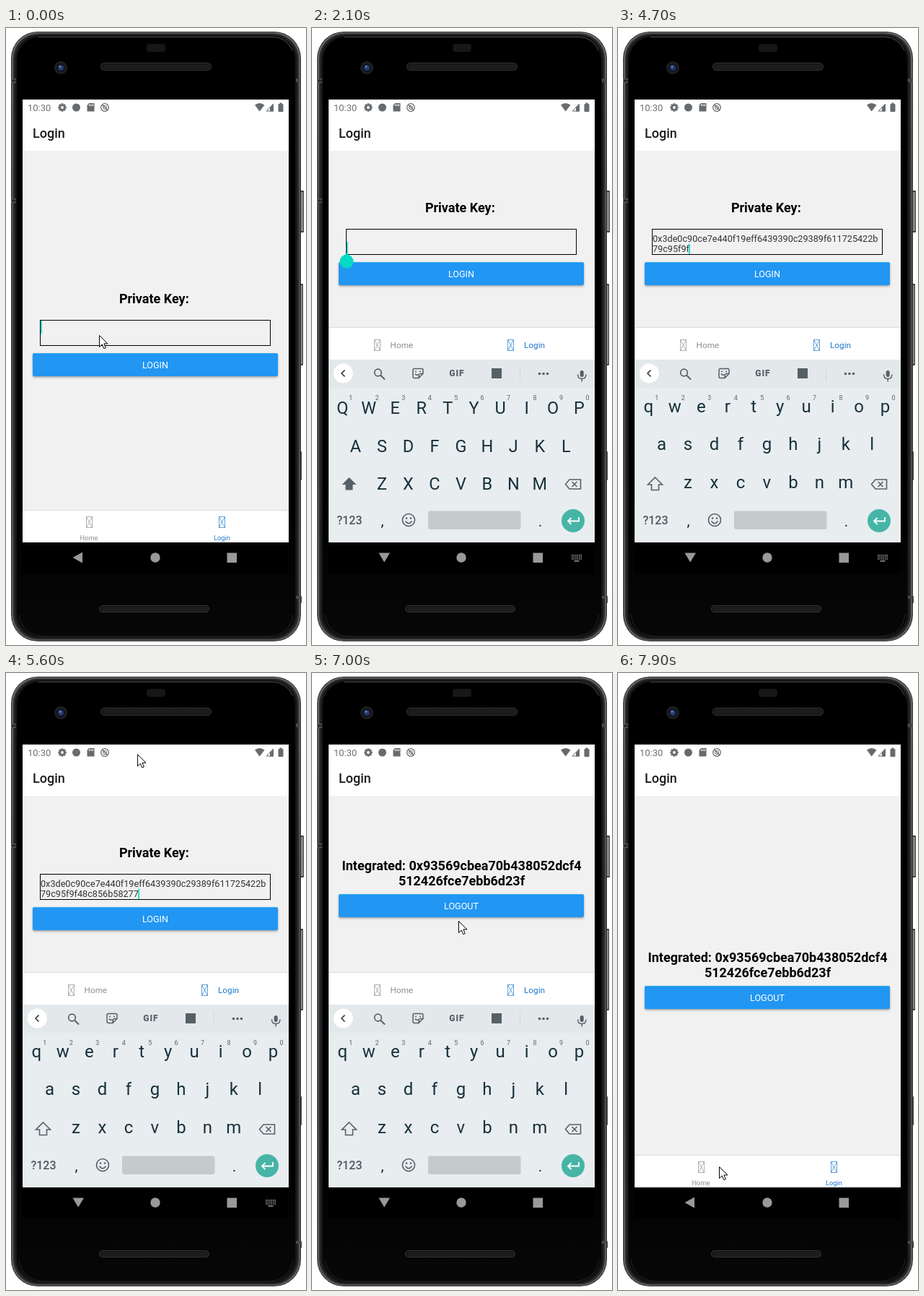
Recreate the animation shown at these times as an HTML page with a canvas. Size 416 by 854 pixels, loop 8000 ms.

```html
<!DOCTYPE html>
<html lang="en">
<head>
<meta charset="utf-8">
<title>Login demo</title>
<style>
html, body { margin: 0; width: 100%; height: 100%; overflow: hidden; background: #fff; }
canvas { display: block; }
</style>
</head>
<body>
<canvas id="stage" width="416" height="854"></canvas>
<script>
const ctx = document.getElementById('stage').getContext('2d');
const LOOP = 8000, STEP = 100;
const KEY = ['0x3de0c90ce7e440f19eff6439390c29389f611725422b', '79c95f9f48c856b58277'];
const ADDRESS = ['Integrated: 0x93569cbea70b438052dcf4', '512426fce7ebb6d23f'];
const ROWS = ['QWERTYUIOP', 'ASDFGHJKL', 'ZXCVBNM'];
const GREY = '#676b6e', INK = '#17313a', ICON = '#566166', TEAL = '#03dac5';

const clamp = (v, a, b) => Math.min(b, Math.max(a, v));

function rect(x, y, w, h, color) {
  ctx.fillStyle = color;
  ctx.fillRect(x, y, w, h);
}
function round(x, y, w, h, r, color) {
  ctx.fillStyle = color;
  ctx.beginPath();
  ctx.roundRect(x, y, w, h, r);
  ctx.fill();
}
function disc(x, y, r, color) {
  ctx.fillStyle = color;
  ctx.beginPath();
  ctx.arc(x, y, r, 0, Math.PI * 2);
  ctx.fill();
}
function ring(x, y, r, color, width) {
  ctx.strokeStyle = color;
  ctx.lineWidth = width;
  ctx.beginPath();
  ctx.arc(x, y, r, 0, Math.PI * 2);
  ctx.stroke();
}
function poly(points, color) {
  ctx.fillStyle = color;
  ctx.fill(new Path2D('M' + points + 'Z'));
}
function line(path, color, width = 1) {
  ctx.strokeStyle = color;
  ctx.lineWidth = width;
  ctx.stroke(new Path2D(path));
}
function text(str, x, y, size, color, weight = 400, align = 'left') {
  ctx.font = `${weight} ${size}px Roboto, sans-serif`;
  ctx.fillStyle = color;
  ctx.textAlign = align;
  ctx.fillText(str, x, y);
  return ctx.measureText(str).width;
}
function at(x, y, draw) {
  ctx.save();
  ctx.translate(x, y);
  draw();
  ctx.restore();
}
function vertical(y0, y1, ...colors) {
  const g = ctx.createLinearGradient(0, y0, 0, y1);
  colors.forEach((c, i) => g.addColorStop(i / (colors.length - 1), c));
  return g;
}

function grille(x, y, w, h) {
  round(x, y, w, h, h / 2, '#161616');
  ctx.strokeStyle = '#333';
  ctx.lineWidth = 1;
  ctx.beginPath();
  ctx.roundRect(x + .5, y + .5, w - 1, h - 1, h / 2);
  ctx.stroke();
  for (let i = 4; i < w - 4; i += 3)
    for (let j = 3; j < h - 2; j += 2) rect(x + i + j % 4 / 2, y + j, 1, 1, '#3c3c3c');
}

function phone() {
  rect(0, 0, 416, 854, '#fff');
  // side buttons
  for (const [y, h, w] of [[225, 58, 5], [354, 113, 4], [586, 40, 2], [786, 10, 2]]) {
    round(407, y, w + 1, h, 1, '#3f3f3f');
    rect(409, y + 2, w - 2, h - 4, '#8a8a8a');
  }
  // nested rims from the outer edge to the glass
  round(7, 5, 402, 844, 37, '#303030');
  round(8, 6, 400, 842, 36, vertical(6, 848, '#686868', '#4c4c4c', '#4c4c4c', '#606060'));
  round(10, 7.5, 396, 839, 35, '#2a2a2a');
  round(12.5, 9.5, 391, 835, 34, '#151515');
  for (const y of [70, 236]) {
    rect(7, y, 7, 6, '#555');
    rect(8, y + 1.5, 6, 3, '#292929');
  }
  rect(402, 70, 7, 5, '#484848');
  rect(402, 786, 7, 4, '#484848');
  round(15, 12, 386, 830, 33, vertical(12, 842, '#000', '#000', '#000', '#000', '#070707'));
  line('M45 12.5H370Q389 13 397 31', '#464646');
  line('M18 812Q22 839 50 842H366Q394 839 398 812', '#252525');
  round(195, 22, 26, 11, 4, '#171717');
  disc(76, 55, 9, '#202020');
  disc(76, 55, 6.5, '#101522');
  disc(76, 55, 3.8, '#283b70');
  disc(75, 53.5, 1.3, '#7690c9');
  grille(131, 48, 154, 11);
  grille(129, 799, 153, 10);
}

function gear(x, y) {
  at(x, y, () => {
    for (let i = 0; i < 4; i++) {
      ctx.rotate(Math.PI / 4);
      rect(-1.5, -5.7, 3, 11.4, GREY);
    }
    disc(0, 0, 4.3, GREY);
    disc(0, 0, 1.9, '#fff');
  });
}

function header() {
  rect(23, 99, 369, 71, '#fff');
  text('10:30', 30, 114.5, 13, '#707070');
  gear(78, 110);
  disc(97.5, 110, 5.5, GREY);
  poly('115 104H122.5V115.5H112.5V107', GREY);
  for (let i = 0; i < 3; i++) rect(115 + i * 2.4, 105.5, 1.2, 2.5, '#fff');
  ring(137, 110, 5.3, GREY, 1.3);
  ring(137, 110, 2.5, GREY, 1);
  line('M134 106.5L141 114', GREY, 1.3);
  poly('345 106.5Q351.5 101.5 358.5 106.5L351.7 115.5', GREY);
  line('M361 115L370.5 105V115Z', GREY);
  poly('366 110L371 105V115.5H366', GREY);
  round(377.5, 105, 7, 11, 1, GREY);
  rect(379.5, 103.5, 3, 2, GREY);
  text('Login', 37, 152, 18, '#1c1c1e', 500);
}

function button(label, y) {
  ctx.save();
  ctx.shadowColor = 'rgba(0,0,0,.35)';
  ctx.shadowBlur = 3;
  ctx.shadowOffsetY = 1.5;
  round(37, y, 340, 32, 2, '#2196f3');
  ctx.restore();
  rect(38, y, 338, 1, '#2fb0ee');
  text(label, 207, y + 21, 12.6, '#fff', 400, 'center');
}

function typedCount(t) {
  return t < 2700 ? 0 : clamp(Math.round(1 + 53 * (t - 2700) / 2000), 0, 66);
}

function caretOn(t) {
  return t < 600 || (t >= 1200 && t < 1600) || (t >= 2100 && t < 5800) || t >= 6300;
}

function loginForm(t, dy) {
  text('Private Key:', 205.3, 255 + dy, 18, '#000', 700, 'center');
  ctx.strokeStyle = '#000';
  ctx.lineWidth = 1;
  ctx.strokeRect(47.5, 278.5 + dy, 319, 35);
  button('LOGIN', 324 + dy);

  const n = typedCount(t), first = KEY[0].slice(0, n), rest = KEY[1].slice(0, Math.max(0, n - KEY[0].length));
  const two = rest !== '', size = 12.67;
  let w = text(first, 48, two ? 295.5 : 309, size, '#333');
  if (two) w = text(rest, 48, 310.3, size, '#333');
  if (caretOn(t)) {
    const top = t < 200 ? 279 + dy : two ? 299 : 296 + dy;
    rect(Math.round(47.5 + w), top, 2, two ? 14 : 18, '#35d9cc');
  }
  if (t >= 200 && n === 0) at(48, 323.3 + dy, () => {
    disc(0, 0, 9.5, TEAL);
    poly('-7 -6.4L0 -11.5L7 -6.4', TEAL);
  });
}

function account(dy) {
  ADDRESS.forEach((s, i) => text(s, 207.5, 273 + i * 21 + dy, 18, '#000', 700, 'center'));
  button('LOGOUT', 306 + dy);
}

function tab(label, portrait, cx, y, color) {
  const x = portrait ? cx : cx - 25, iy = portrait ? y + 16.5 : y + 24;
  at(Math.floor(x) - 3.5, Math.floor(iy) - 7.5, () => line('M0 0H8V15H0ZL8 15M8 0L0 15', color, .7));
  if (portrait) text(label, cx, y + 41, 9.3, color, 400, 'center');
  else text(label, cx - 6.5, y + 27.5, 11.8, color);
}

function tabs(y, portrait, height) {
  rect(23, y - 1, 369, 1, '#dcdcdc');
  rect(23, y, 369, height, '#fff');
  tab('Home', portrait, 115, y, '#8e8e8f');
  tab('Login', portrait, portrait ? 299.5 : 300.5, y, '#2079cb');
}

function toolbar() {
  rect(23, 459, 369, 39, '#e3e8eb');
  disc(43.3, 478, 13.5, '#fff');
  line('M45.5 473.5L41 478L45.5 482.5', '#333', 1.6);
  ring(91.5, 477, 4.8, ICON, 1.7);
  line('M95 480.5L101 486.5', ICON, 2);
  line('M142 471.5H152Q154 471.5 154 473.5V478.5L148 484.5H142Q140 484.5 140 482.5V473.5Q140 471.5 142 471.5ZM154 478.5H150Q148 478.5 148 484.5M143 478.5Q145 481.5 148 479.5', ICON, 1.5);
  disc(144, 475.5, 1, ICON);
  disc(150, 475.5, 1, ICON);
  ctx.letterSpacing = '1px';
  text('GIF', 201, 482.2, 12, ICON, 900, 'center');
  ctx.letterSpacing = '0px';
  rect(249, 471, 14, 14, ICON);
  rect(288, 469, 1, 19, '#d2d7da');
  for (let i = 0; i < 3; i++) disc(315.5 + i * 5.5, 478.5, 1.8, ICON);
  round(371.7, 474, 5, 9, 2.5, ICON);
  line('M368.5 479.5Q368.5 485.5 374.2 485.5Q380 485.5 380 479.5M374.2 485.5V489.5', ICON, 1.5);
}

function keys(lower) {
  const starts = [42.3, 60.5, 97];
  ROWS.forEach((row, r) => [...row].forEach((c, i) => {
    const x = starts[r] + i * 36.47, y = 534 + r * 52.6;
    if (lower) text(c.toLowerCase(), x, y - 2.5, 24, INK, 400, 'center');
    else text(c, x, y, 23.5, INK, 400, 'center');
    if (r === 0) text(String((i + 1) % 10), x + 11.5, 514.5, 9, '#59666b', 400, 'center');
  }));

  const arrow = 'M51.5 622L61.5 632H56.5V639.5H46.5V632H41.5Z';
  if (lower) line(arrow, ICON, 1.6);
  else {
    ctx.fillStyle = ICON;
    ctx.fill(new Path2D(arrow));
  }
  line('M357 625H372.5V638H357L351.5 631.5ZM360.5 628L367.5 635M367.5 628L360.5 635', ICON, 1.6);
  text('?123', 52, 687, 16, '#4c595e', 500, 'center');
  text(',', 97.5, 689, 21, INK, 400, 'center');
  text('.', 316.5, 690, 21, INK, 400, 'center');
  ring(134, 681, 8.5, ICON, 1.6);
  disc(131, 678.5, 1.3, ICON);
  disc(137, 678.5, 1.3, ICON);
  line('M129.5 682.5Q134 689 138.5 682.5', ICON, 1.5);
  round(161, 668.5, 128.5, 25.5, 3, '#c5cacd');
  disc(362, 682, 16, '#46b5a6');
  line('M370 677V682.5H355M359.5 678L355 682.5L359.5 687', '#fff', 1.8);
}

function keyboard(lower, drop, fade) {
  ctx.save();
  ctx.beginPath();
  ctx.rect(23, 459, 369, drop ? 257 : 253);
  ctx.clip();
  at(0, drop, () => {
    rect(23, 459, 369, 253, '#e8edf0');
    if (fade) rect(23, 459, 369, 253, `rgba(255,255,255,${fade})`);
    toolbar();
    keys(lower);
  });
  if (fade) rect(23, 459 + drop, 369, 260, `rgba(255,255,255,${fade})`);
  if (drop) rect(23, 712, 369, 4, '#d2d4d4');
  ctx.restore();
}

function navBar(down, picker) {
  const c = '#999';
  rect(23, 712, 369, 43, '#000');
  poly(down ? '92.5 726.5H108L100.2 739.5' : '92.5 733L106 725.5V740.5', c);
  disc(207, 733, 6.7, c);
  rect(306.5, 726.5, 13.5, 13.5, c);
  if (!picker) return;
  for (let r = 0; r < 3; r++)
    for (let i = 0; i < 6; i++) rect(360 + i * 2.5, 729 + r * 2.6, 1.5, 1.5, c);
  rect(363.5, 737, 7, 1.5, c);
}

function mouseAt(t) {
  if (t < 1000) return [129, 425];
  if (t < 5200) return null;
  if (t < 6300) {
    // sweep in from the upper left, then settle over the button
    const k = (t - 5200) / 1100, m = 1 - k;
    const mix = (a, b, c, d) => m * m * m * a + 3 * m * m * k * b + 3 * m * k * k * c + k * k * k * d;
    return [mix(0, 190, 350, 203), mix(28, 35, 290, 343)];
  }
  const k = clamp((t - 7300) / 600, 0, 1), e = k * k * (3 - 2 * k);
  return [203 - 63 * e, 343 + 340 * e];
}

function mouse(t) {
  const pos = mouseAt(t);
  if (!pos) return;
  at(pos[0] + .5, pos[1] + .5, () => {
    const p = 'M0 0V16L3.8 12.5L6.3 18.2L8.8 17.1L6.4 11.4H11.5Z';
    ctx.fillStyle = '#fff';
    ctx.fill(new Path2D(p));
    line(p, '#000');
  });
}

function draw(t) {
  const open = t >= 300 && t < 7100;
  const dy = open ? 0 : 126.5;
  const drop = t < 400 ? 40 : t < 500 ? 4.7 : 0;
  const fade = t < 400 ? .4 : t < 500 ? .12 : 0;

  phone();
  header();
  rect(23, 170, 369, 542, '#f1f1f1');
  if (t < 6700) loginForm(t, Math.floor(dy));
  else account(Math.ceil(dy));
  navBar(open, open && t < 7000);
  tabs(open ? 415 : 668, t < 500 || t >= 7400, open ? 297 : 44);
  if (open) keyboard(t >= 2700, drop, fade);
  mouse(t);
}

const start = performance.now();
function tick() {
  const t = (performance.now() - start) % LOOP;
  draw(Math.floor(t / STEP) * STEP);
  requestAnimationFrame(tick);
}
tick();
</script>
</body>
</html>
```
